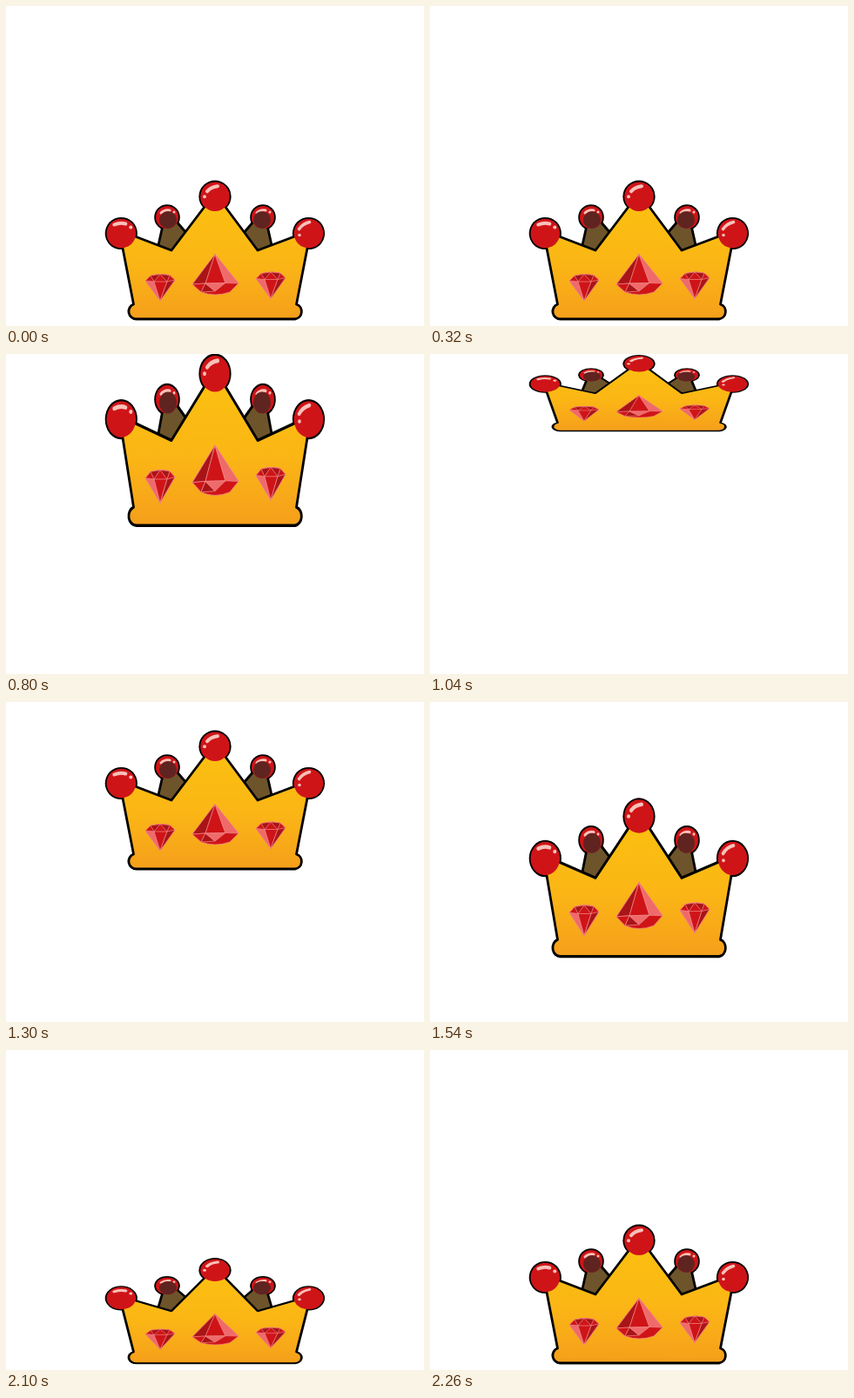
Animation, 480 px wide and 368 px high, one loop 2360 ms. Source, as an HTML page:

```html
<!DOCTYPE html>
<html lang="en">
<head>
<meta charset="utf-8">
<title>Bouncing crown</title>
<style>
  html, body { margin: 0; width: 100%; height: 100%; overflow: hidden; background: #fff; }
  svg { display: block; }
  .line { stroke: #000; stroke-width: 2.8; stroke-linejoin: round; }
  .facet { stroke: #f08a88; stroke-width: .7; stroke-linejoin: round; }
  .shine { fill: none; stroke: #f9c0b8; stroke-linecap: round; }
  .red { fill: #cf1418; }
  .dark { fill: #a91417; }
  .pink { fill: #ef6a6a; }
</style>
</head>
<body>
<svg width="480" height="368" viewBox="0 0 480 368">
  <defs>
    <linearGradient id="gold" gradientUnits="userSpaceOnUse" x1="0" y1="230" x2="0" y2="360">
      <stop offset="0" stop-color="#fbbf10"/>
      <stop offset=".5" stop-color="#fbb615"/>
      <stop offset="1" stop-color="#f59f1b"/>
    </linearGradient>
    <g id="gem">
      <path class="facet red" d="M-17 -1L-11 -7Q0 -10 11 -7.500L17 -2L0 22Z"/>
      <path class="facet dark" d="M-11 -7L-7 0L0 -8.500Z"/>
      <path class="facet dark" d="M0 -8.500L8 0L11 -7.500Z"/>
      <path class="facet pink" d="M-17 -1L-7 0L0 22Z"/>
      <path class="facet red" d="M-7 0L8 0L0 22Z"/>
      <path class="facet dark" d="M8 0L17 -2L0 22Z"/>
    </g>
    <g id="bigGem">
      <path class="facet red" d="M240 285.500L214 320L224 329Q240 335 257 329L267 319Z"/>
      <path class="facet dark" d="M240 285.500L214 320L229 319Z"/>
      <path class="facet red" d="M240 285.500L229 319L252 318.500Z"/>
      <path class="facet pink" d="M240 285.500L252 318.500L267 319Z"/>
      <path class="facet red" d="M214 320L229 319L224 329Z"/>
      <path class="facet dark" d="M229 319L240 328L224 329Z"/>
      <path class="facet pink" d="M229 319L252 318.500L240 328Z"/>
    </g>
  </defs>
  <g id="crown">
    <g id="backRings"></g>
    <path class="line" fill="#6d542b" d="M181 248L174.500 277L190 285L208 262L195 247Z"/>
    <path class="line" fill="#6d542b" d="M299 248L305.500 277L289 285L272 262L285 247Z"/>
    <g id="backBalls"></g>
    <g id="frontRings"></g>
    <path class="line" fill="url(#gold)" d="M130 258L190 281L240 215L289 281L350 258L333.500 343A8.800 8.800 0 0 1 332 360L150 360A8.800 8.800 0 0 1 146.500 343Z"/>
    <use href="#bigGem"/>
    <use href="#gem" x="177" y="317"/>
    <use href="#gem" x="304" y="314.500"/>
    <g id="frontBalls"></g>
  </g>
</svg>
<script>
const byId = id => document.getElementById(id);

// Balls carry a curved highlight and a small dot; back ones are shaded
const backBalls = [
  { x: 185, y: 243, r: 13, shine: 'M-7 -5Q-3 -9 3 -8', dot: [8, -6], width: 3, shade: 1 },
  { x: 295, y: 243, r: 13, shine: 'M-7 -5Q-3 -9 3 -8', dot: [8, -6], width: 3, shade: -1 }
];
const frontBalls = [
  { x: 240, y: 219.2, r: 16.8, shine: 'M-9 -6Q-5 -11 3 -12', dot: [-12, 0], width: 4 },
  { x: 132.3, y: 261.5, r: 16.8, shine: 'M-8 -10Q-1 -13 5 -11', dot: [11, -7], width: 4 },
  { x: 347.5, y: 261.5, r: 16.8, shine: 'M-11 -5Q-7 -11 1 -13', dot: [-10.5, 2], width: 3.6 }
];

const ring = b => `<circle cx="${b.x}" cy="${b.y}" r="${b.r + 1.8}"/>`;
const ball = b => `<g transform="translate(${b.x} ${b.y})">
  <circle class="red" r="${b.r}"/>
  <path class="shine" stroke-width="${b.width}" d="${b.shine}"/>
  <circle cx="${b.dot[0]}" cy="${b.dot[1]}" r="${b.width / 2}" fill="#f9c0b8"/>
  ${b.shade ? `<circle cx="${b.shade}" cy="3" r="10" fill="#5f2420"/>` : ''}
</g>`;

// Rings lie under the gold, so only the outer silhouette is outlined
function fill(id, list, shape) {
  byId(id).innerHTML = list.map(shape).join('');
}
fill('backRings', backBalls, ring);
fill('backBalls', backBalls, ball);
fill('frontRings', frontBalls, ring);
fill('frontBalls', frontBalls, ball);

// Step, vertical scale, height of the base line
const FLOOR = 361;
const keys = [
  [0, 1, FLOOR], [2, .52, FLOOR], [4, 1, FLOOR], [5, 1.24, FLOOR],
  [8, 1.24, 262], [10, 1.24, 198.5], [13, .548, 89], [15, 1, 160.5],
  [16, 1, 193], [21, 1.24, FLOOR], [24, .52, FLOOR], [28, 1, FLOOR]
];
const LOOP = 2360, STEP = 80, HOLD = 20;

// Steps 13 and 28 last a little longer than the rest
const stepAt = t => t < 1140
  ? Math.min(Math.floor(t / STEP), 13)
  : Math.min(Math.floor((t - HOLD) / STEP), 28);

function pose(step) {
  const i = Math.max(1, keys.findIndex(k => k[0] >= step));
  const a = keys[i - 1], b = keys[i];
  const p = (step - a[0]) / (b[0] - a[0]);
  const mix = n => a[n] + (b[n] - a[n]) * p;
  return [mix(1), mix(2)];
}

const crown = byId('crown');
const start = performance.now();
function draw(now) {
  const t = Math.max(0, now - start) % LOOP;
  const [scale, base] = pose(stepAt(t));
  crown.setAttribute('transform', `translate(0 ${base}) scale(1 ${scale}) translate(0 ${-FLOOR})`);
  requestAnimationFrame(draw);
}
draw(start);
</script>
</body>
</html>
```
